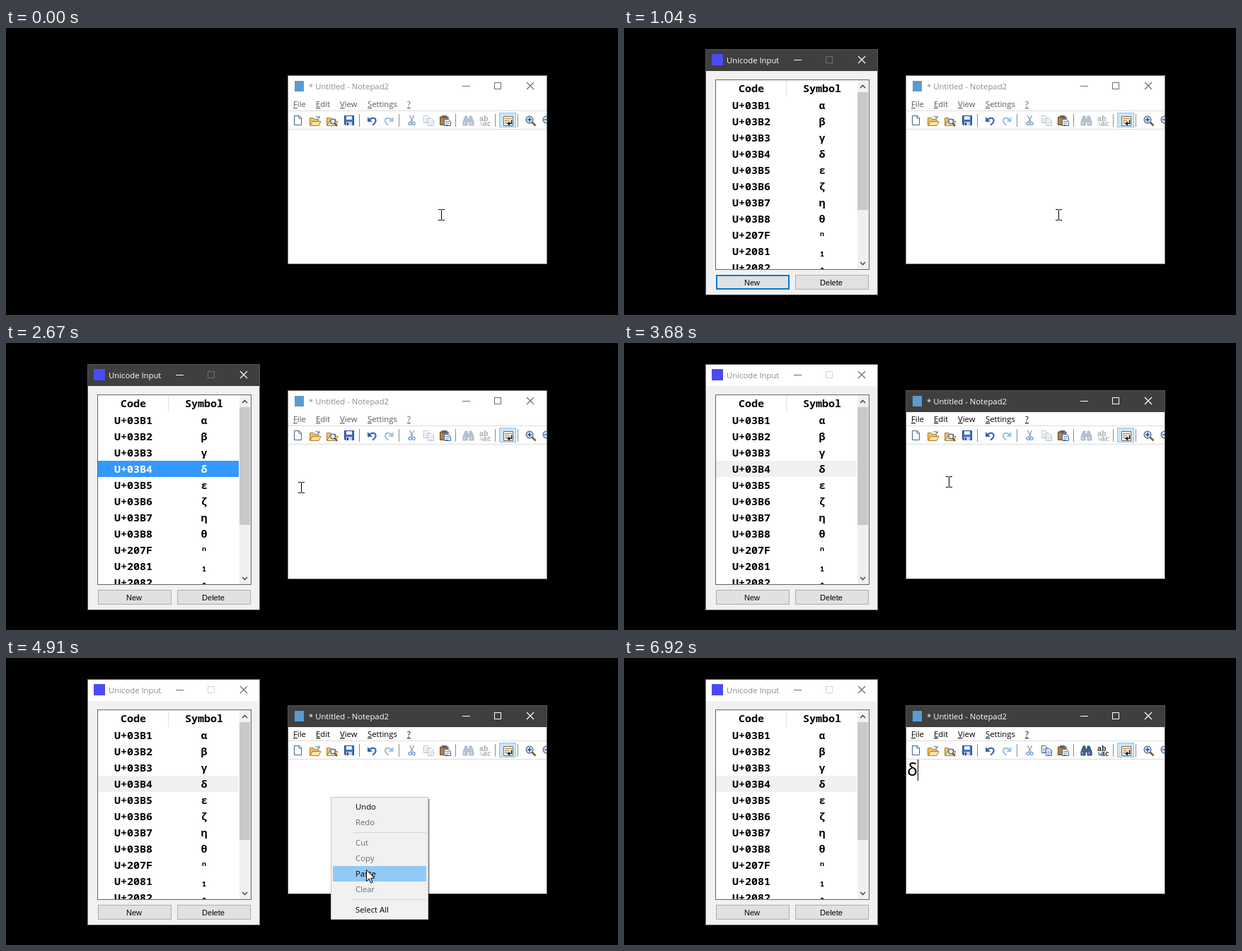
Animation, 865 px wide and 407 px high, one loop 6990 ms. Source, as an HTML page:

```html
<!DOCTYPE html>
<html lang="en">
<head>
<meta charset="utf-8">
<title>Unicode Input</title>
<style>
  html, body { margin: 0; width: 100%; height: 100%; overflow: hidden; background: #000; }
  svg { display: block; width: 865px; height: 407px; font: 11.3px "Open Sans", sans-serif; }
  text { white-space: pre; }
  rect, .crisp { shape-rendering: crispEdges; }
  .line { fill: none; stroke: currentColor; }
  .frame { fill: none; stroke: #7c7c7c; }
  .bar { fill: #fff; }
  .title { color: #6c6c6c; }
  .title text { fill: #8c8c8c; }
  .title .off { color: #d4d4d4; }
  .active .bar { fill: #3f3f3f; }
  .active .frame { stroke: #555; }
  .active .title { color: #fff; }
  .active .title text { fill: #fff; }
  .active .title .off { color: #707070; }
  .menubar { fill: #5a5a5a; }
  .active .menubar { fill: #000; }
  .mono { font: bold 15px "Noto Sans Mono", "DejaVu Sans Mono", monospace; text-anchor: middle; }
  .button { font: 11px "Liberation Sans", Arial, sans-serif; text-anchor: middle; }
  .disabled { opacity: .38; }
</style>
</head>
<body>
<svg id="stage" viewBox="0 0 865 407"></svg>
<script>
const LOOP = 6990, STEP = 230 / 3;

// Bursts of picture changes: start time and number of steps.
const bursts = [[0, 1], [430, 1], [810, 7], [1440, 10], [2210, 9], [2970, 4], [3680, 1],
  [3980, 9], [4680, 6], [5290, 10], [6060, 1], [6210, 4], [6920, 1]];

// Pointer path: time, x, y.
const path = [[0, 615, 265], [429, 615, 265], [430, 614, 265], [1040, 614, 265], [1270, 603, 265],
  [1440, 580, 257], [1590, 470, 222], [1747, 360, 192], [1823, 331, 185], [1900, 317, 183],
  [2050, 300, 181], [2130, 297, 180], [2360, 299, 182], [2440, 308, 185], [2517, 335, 190],
  [2670, 417, 205], [2747, 442, 203], [2823, 453, 200], [2970, 456, 198], [3200, 459, 197],
  [4290, 459, 196], [4370, 464, 203], [4440, 470, 218], [4520, 480, 240], [4600, 489, 262],
  [4680, 497, 280], [4757, 503, 294], [4833, 508, 301], [5060, 510, 298], [5520, 510, 298],
  [5600, 511, 295], [5830, 516, 270], [5980, 520, 256], [6060, 520, 255], [6210, 528, 262],
  [6287, 590, 310], [6363, 729, 379]];

const rows = [..."αβγδεζηθⁿ₁₂"].map((symbol, i) => ({
  symbol, y: 115 + 23 * i,
  code: "U+" + symbol.codePointAt(0).toString(16).toUpperCase().padStart(4, "0")
}));
const menuItems = [["Undo", 211, 1], ["Redo", 233], ["Cut", 262], ["Copy", 284],
  ["Paste", 306, 1], ["Clear", 328], ["Select All", 357, 1]];

const rect = (x, y, w, h, fill, extra = "") =>
  `<rect x="${x}" y="${y}" width="${w}" height="${h}" fill="${fill}" ${extra}/>`;
const box = (x, y, w, h, fill, stroke, extra = "") =>
  rect(x + .5, y + .5, w - 1, h - 1, fill, `stroke="${stroke}" ${extra}`);
const label = (x, y, text, extra = "") => `<text x="${x}" y="${y}" ${extra}>${text}</text>`;
const shape = (d, fill, stroke = "none", width = 1) =>
  `<path d="${d}" fill="${fill}" stroke="${stroke}" stroke-width="${width}"/>`;
const at = (x, y, body, extra = "") => `<g transform="translate(${x} ${y})" ${extra}>${body}</g>`;

const controls = (x, y, maxClass) => `
  <path class="line crisp" d="M${x - 51} ${y + .5}h11"/>
  <path class="line crisp ${maxClass}" d="M${x - 5.5} ${y - 4.5}h9v9h-9z"/>
  <path class="line" d="M${x + 40} ${y - 5}l10 10m0-10l-10 10" stroke-width="1.2"/>`;

const button = (x, text, id) =>
  box(x, 350, 104, 21, "#e1e1e1", "#adadad") +
  (id ? rect(x + 1, 351, 102, 19, "none", `id="${id}" stroke="#0078d7" stroke-width="2"`) : "") +
  label(x + 51, 365, text, 'class="button"');

const unicodeWindow = `
<g id="unicode" class="active">
  ${rect(115, 30, 244, 349, "#f1f1f1")}
  ${rect(115, 30, 244, 31, "", 'class="bar"').replace('fill=""', "")}
  <rect class="frame" x="115.5" y="30.5" width="243" height="348"/>
  <g class="title">${rect(124, 37, 16, 16, "#4b4bf6")}${label(145, 50, "Unicode Input")}${controls(291, 45, "off")}</g>
  ${rect(129, 73, 218, 270, "#fff")}
  <svg x="129" y="73" width="218" height="269" viewBox="129 73 218 269">
    ${rect(130, 167, 199, 23, "#39f", 'id="selection"')}
    ${rect(229, 74, 1, 24, "#e2e2e2")}
    <g class="mono">
      ${label(180, 91, "Code")}${label(280, 91, "Symbol")}
      ${rows.map(r => `<g id="${r.code}">${label(180, r.y, r.code)}${label(280, r.y, r.symbol)}</g>`).join("")}
    </g>
  </svg>
  ${rect(330, 74, 16, 268, "#f0f0f0")}
  ${rect(330, 91, 15, 167, "#c9c9c9", 'id="thumb"')}
  ${shape("M334 85l3.5-3.5 3.5 3.5M334 332l3.5 3.5 3.5-3.5", "none", "#505050", 1.6)}
  ${box(129, 73, 218, 270, "none", "#646464")}
  ${button(130, "New", "focus")}${button(242, "Delete")}
</g>`;

const lens = (sign) =>
  shape("M9.5 9.5l5 5", "none", "#8a5a2c", 2.6) +
  `<circle cx="6" cy="6" r="4.8" fill="#e4f1fd" stroke="#536c94" stroke-width="1.4"/>` +
  shape(sign, "none", "#1c4f9c", 1.6);
const folder = shape("M.5 14V3.5h5l1.5 2h6V14z", "#efc063", "#a97a32") +
  shape("M1 14.5L4 8.5h12l-3 6z", "#ffe3a0", "#a97a32");
const page = (x, y, w, h) => shape(`M${x} ${y}h${w - 3}l3 3v${h - 3}h-${w}z`, "#fff", "#42608f");
const wordLines = (x, y) => shape(`M${x} ${y}h6m-6 2.5h6m-6 2.5h4`, "none", "#5b86c4");

const toolbar = `
  ${at(407, 124, page(.5, .5, 10, 13) + shape("M7 1v3h3", "none", "#42608f"))}
  ${at(429, 124, folder + shape("M8 2.5q3-3 6 1m0-3v3h-3", "none", "#4777b4"))}
  ${at(453, 124, folder + `<circle cx="9" cy="8.5" r="3.4" fill="#dceefc" stroke="#4d6487" stroke-width="1.3"/>` +
    shape("M11.5 11l3.5 4", "none", "#7a4a20", 2))}
  ${at(478, 124, shape("M.5 .5h13v13h-12l-1-1z", "#3c72c4", "#27457f") + rect(3, 1, 8, 5, "#e9f2ff") +
    rect(3, 9, 8, 5, "#c9d4e4") + rect(4, 10, 2, 4, "#27457f"))}
  ${at(511, 124, shape("M3 5.5q7-4 8.5 1 .5 4-4.5 7", "none", "#3565b5", 2.2) + shape("M0 2v7h7z", "#3565b5"))}
  ${at(535, 124, shape("M9.5 5.5q-7-4-8.5 1-.5 4 4.5 7", "none", "#9cc3e4", 2.2) + shape("M12.5 2v7h-7z", "#9cc3e4"))}
  ${at(568, 124, shape("M2.5 0l4.5 9M8.5 0L4 9", "none", "#8ba2c0", 1.4) +
    `<g fill="none" stroke="#7fa6da" stroke-width="1.6"><circle cx="3" cy="11.5" r="2"/><circle cx="8" cy="11.5" r="2"/></g>`)}
  ${at(590, 124, page(.5, .5, 8, 10) + wordLines(2, 4) + page(6.5, 4.5, 8, 10) + wordLines(8, 8), 'class="edit"')}
  ${at(613, 124, shape("M.5 2h11.5v11.5H.5z", "#b5813d", "#6d4a1f") + rect(3, 0, 7, 4, "#5b6472") +
    page(6.5, 5.5, 9, 9) + wordLines(8, 8.5))}
  ${at(646, 124, shape("M3 1h3v4h3V1h3l3 8v5H9V9H6v5H0V9z", "#42638f", "#243d62") +
    shape("M2 9.5v3m9.5-3v3", "none", "#a9c5e8", 1.5), 'class="edit"')}
  <g class="edit" font-family="'Noto Serif', serif" font-weight="bold" font-size="10" fill="#222">
    ${label(669, 132, "ab")}${label(674, 139, "ac")}
    ${shape("M671 133v4h3m-2-2l2 2-2 2", "none", "#3565b5")}
  </g>
  ${box(697, 120, 24, 21, "#cce5f8", "#8cc4ee")}
  ${at(703, 125, shape("M.5 .5h13v13H.5z", "#fff", "#6a6a6a") +
    shape("M2 3.5h10M2 6.5h6M2 9.5h4", "none", "#c08a35", 1.4) +
    shape("M11.5 5.5v5H7", "none", "#111", 1.6) + shape("M9 7.5v6l-4-3z", "#111"))}
  ${at(734, 124, lens("M3 6h6M6 3v6"))}
  ${at(758, 124, lens("M3 6h6"))}
  ${[499, 555, 635, 691, 723].map(x => rect(x, 122, 1, 18, "#8d8d8d")).join("")}`;

const menubar = [["File", 406], ["Edit", 438], ["View", 472], ["Settings", 511], ["?", 567]]
  .map(([name, x]) => label(x, 112, `<tspan text-decoration="underline">${name[0]}</tspan>${name.slice(1)}`)).join("");

const notepadWindow = `
<g id="notepad">
  ${rect(399, 68, 366, 267, "#fff")}
  <rect class="bar" x="399" y="68" width="365" height="30"/>
  <g class="title">${rect(408, 75, 13, 15, "#5b9bd0")}${label(428, 87, "* Untitled - Notepad2")}${controls(696, 82, "")}</g>
  <g class="menubar">${menubar}</g>
  ${rect(399, 117, 365, 1, "#dcdcdc")}${rect(399, 143, 365, 1, "#dcdcdc")}
  <svg x="399" y="118" width="365" height="25" viewBox="399 118 365 25">${toolbar}</svg>
  <text id="typed" x="400" y="167" style="font:25px 'Noto Sans Mono','DejaVu Sans Mono',monospace">δ</text>
  ${rect(400, 144, 1, 30, "#000", 'id="caret"')}
  <rect class="frame" x="398.5" y="67.5" width="366" height="267"/>
</g>`;

const contextMenu = `
<g id="menu">
  ${rect(462, 200, 137, 172, "#000", 'opacity=".22"')}${rect(462, 200, 136, 172, "#000", 'opacity=".3"')}
  ${box(459, 197, 138, 174, "#f1f1f1", "#c6c6c6")}
  ${rect(490, 247, 104, 1, "#d5d5d5")}${rect(490, 342, 104, 1, "#d5d5d5")}
  ${rect(462, 0, 132, 22, "#91c9f7", 'id="hover"')}
  ${menuItems.map(([name, y, on]) => label(494, y + 4, name, `fill="${on ? "#000" : "#6d6d6d"}"`)).join("")}
</g>
<g id="chosen">${rect(462, 295, 132, 22, "#91c9f7")}${label(494, 310, "Paste")}</g>`;

const pointers = `
<g id="pointer">
  <path id="beam" class="line crisp" d="M-4-7.5h4m1 0h4M.5-7v14M-4 7.5h4m1 0h4"/>
  <path id="arrow" d="M.5.5v16l3.7-3.5 2.6 6 2.3-1-2.5-5.8h5.1z" fill="#fff" stroke="#000"/>
</g>`;

const stage = document.getElementById("stage");
stage.innerHTML = unicodeWindow + notepadWindow + contextMenu + pointers;

const $ = id => document.getElementById(id);
const show = (id, on) => { $(id).style.display = on ? "" : "none"; };
const within = (v, from, to) => v >= from && v < to;
const clamp = v => Math.max(0, Math.min(1, v));

function snap(t) {
  const [start, count] = bursts.findLast(b => b[0] <= t);
  return start + Math.min(count - 1, Math.floor((t - start) / STEP)) * STEP;
}

function pointerAt(t) {
  const next = path.findIndex(p => p[0] > t);
  if (next < 0) return path[path.length - 1].slice(1);
  const [t0, x0, y0] = path[next - 1], [t1, x1, y1] = path[next];
  const k = (t - t0) / (t1 - t0);
  return [Math.round(x0 + (x1 - x0) * k), Math.round(y0 + (y1 - y0) * k)];
}

function draw(time) {
  const t = snap(time), [x, y] = pointerAt(t);
  const menuOpen = within(t, 3980, 5290), pasted = t >= 5290;

  const opening = 1 - (1 - clamp((t - 765) / 240)) ** 2;
  const scale = .957 + .043 * opening;
  show("unicode", t >= 810);
  $("unicode").setAttribute("opacity", opening);
  $("unicode").setAttribute("transform",
    `translate(237 204.5) scale(${scale}) translate(-237 -204.5)`);
  $("unicode").classList.toggle("active", t < 2970);
  $("notepad").classList.toggle("active", t >= 3040);

  const selected = t >= 2280, focused = t < 2970;
  show("focus", !selected);
  show("selection", selected);
  $("selection").setAttribute("fill", focused ? "#39f" : "#f0f0f0");
  $("U+03B4").setAttribute("fill", selected && focused ? "#fff" : "#000");
  $("thumb").setAttribute("fill", within(x, 330, 346) && within(y, 91, 258) ? "#b0b0b0" : "#c9c9c9");

  show("typed", pasted);
  document.querySelectorAll(".edit").forEach(e => e.classList.toggle("disabled", !pasted));
  show("caret", [[3120, 3680], [4285, 4830], [5895, 6435], [6920, LOOP]].some(([a, b]) => within(t, a, b)));
  $("caret").setAttribute("x", pasted ? 415 : 400);

  const item = menuItems.find(([, cy, on]) => on && within(y, cy - 11, cy + 11));
  show("menu", menuOpen);
  $("menu").setAttribute("opacity", clamp((t - 3930) / 170));
  show("hover", item && x > 461);
  if (item) $("hover").setAttribute("y", item[1] - 11);
  show("chosen", within(t, 5290, 5590));
  $("chosen").setAttribute("opacity", clamp(1 - (t - 5270) / 325));

  const editing = !menuOpen && within(x, 399, 764) && within(y, 144, 335);
  show("pointer", t < 6435);
  show("beam", editing);
  show("arrow", !editing);
  $("pointer").setAttribute("transform", `translate(${x} ${y})`);
}

const begin = performance.now();
function tick() {
  draw((performance.now() - begin) % LOOP);
  requestAnimationFrame(tick);
}
tick();
</script>
</body>
</html>
```
